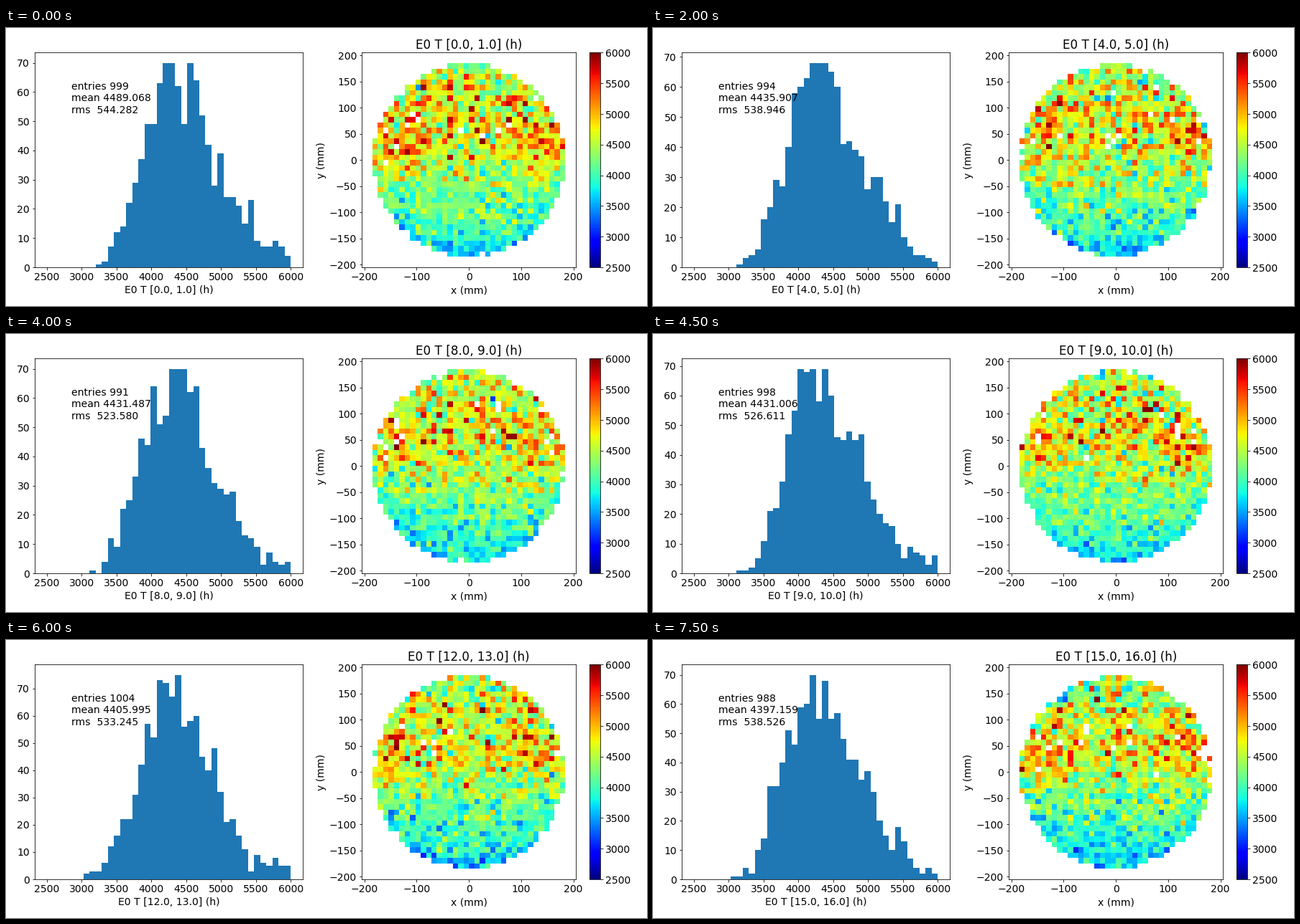
A matplotlib script for the animation above (8000 ms loop, 892 by 388 pixels).

```python
import numpy as np
import matplotlib.pyplot as plt
from matplotlib.animation import FuncAnimation

plt.rcParams["font.size"] = 14

W, H, DPI = 892, 388, 72
HOURS, BINS, LO, HI = 16, 40, 2500, 6000
STEP = (HI - LO) / BINS
N, PITCH = 36, 10.25  # disc cells across, cell size in mm

# hour, entries, mean, rms, tallest bar; hours in between are interpolated
KEYS = np.array([
    (0, 999, 4489.068, 544.282, 70),
    (2, 996, 4474.662, 532.193, 82),
    (4, 994, 4435.907, 538.946, 68),
    (8, 991, 4431.487, 523.580, 70),
    (10, 1006, 4430.524, 529.641, 68),
    (12, 1004, 4405.995, 533.245, 75),
    (15, 988, 4397.159, 538.526, 70),
])

rows, cols = np.mgrid[:N, :N]
x, y = (cols - 17.5) / 18, (17.5 - rows) / 18
r2 = x**2 + y**2
disc = r2 < 0.9923


def sample(n, mean, rms, rng):
    """Right-skewed values with the given mean and spread, folded back below HI."""
    z = rng.gamma(16, 0.25, n)
    v = mean + rms * (z - z.mean()) / z.std()
    return np.sort(np.minimum(v, 2 * HI - v))


def warmth(rng):
    """Warm band and sides above the middle, cool lower rim, plus noise."""
    s = np.interp(y, [-1, -0.6, -0.2, 0.25, 0.6, 1], [-0.9, -0.5, -0.1, 0.45, 0.35, 0])
    s += 0.5 * np.exp(-((abs(x) - 0.75) / 0.2)**2 - ((y - 0.2) / 0.25)**2)
    s -= np.where(y < -0.2, 0.45 * r2**4, 0)
    return s + rng.normal(size=s.shape) * np.interp(y, [-0.9, -0.3, 0.2], [0.42, 0.45, 0.65])


def make(h):
    rng = np.random.default_rng(40 + h)
    n, mean, rms, peak = (np.interp(h, KEYS[:, 0], k) for k in KEYS[:, 1:].T)
    n, peak = round(n), round(peak)
    vals = sample(n, mean, rms, rng)
    counts = np.minimum(np.histogram(vals, BINS, (LO, HI))[0], peak)
    counts[counts.argmax()] = peak

    # Rank the cells by warmth; the warmest overflow and a few rim cells stay empty.
    score = warmth(rng)
    spare = disc.sum() - n
    rim = np.where(disc, r2 + rng.normal(0, 0.025, r2.shape), 0)
    live = disc.copy()
    live.flat[np.argsort(rim, axis=None)[::-1][:spare // 2]] = False
    spots = np.flatnonzero(live)
    spots = spots[np.argsort(score.flat[spots])][:n]
    grid = np.full((N, N), np.nan)
    grid.flat[spots] = vals
    return f"entries {n}\nmean {mean:.3f}\nrms  {rms:.3f}", counts, np.ma.masked_invalid(grid)


data = [make(h) for h in range(HOURS)]

fig = plt.figure(figsize=(W / DPI, H / DPI), dpi=DPI, facecolor="white")


def axes(x0, x1, top=34.4, bottom=334):
    return fig.add_axes([x0 / W, 1 - bottom / H, (x1 - x0) / W, (bottom - top) / H])


hist, disk, cax = axes(40.1, 413.1), axes(495.1, 793.3), axes(812.1, 827.1)

bars = hist.bar(LO + STEP * np.arange(BINS), np.ones(BINS), STEP, align="edge", color="#1f77b4")
hist.set_xlim(2325, 6175)
note = hist.text(2850, 0.709, "", transform=hist.get_xaxis_transform(), va="bottom")

edges = (np.arange(N + 1) - N / 2) * PITCH
mesh = disk.pcolormesh(edges, -edges, data[0][2], cmap="jet", vmin=LO, vmax=HI)
disk.set(xlim=(-205, 205), ylim=(-205, 205), xlabel="x (mm)", ylabel="y (mm)")
fig.colorbar(mesh, cax=cax)


def update(i):
    text, counts, grid = data[i]
    for bar, c in zip(bars, counts):
        bar.set_height(c)
    hist.set_ylim(0, 1.05 * counts.max())
    label = f"E0 T [{i:.1f}, {i + 1:.1f}] (h)"
    hist.set_xlabel(label)
    disk.set_title(label)
    note.set_text(text)
    mesh.set_array(grid)
    return [*bars, note, mesh]


anim = FuncAnimation(fig, update, frames=HOURS, interval=500, repeat=True, repeat_delay=0)
plt.show()
```
